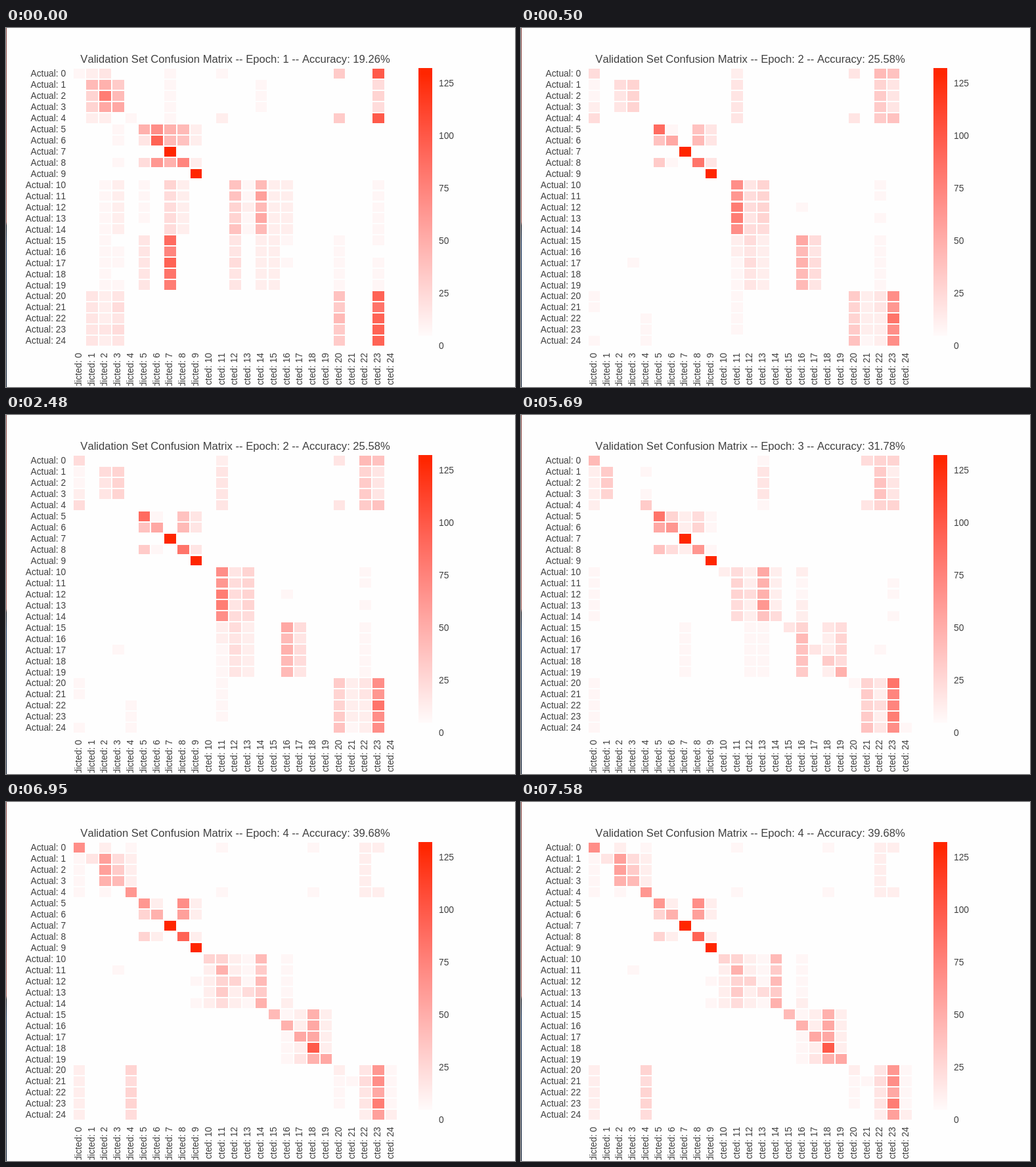
Recreate the animation shown at these times as an HTML page. Size 775 by 547 pixels, loop 8000 ms.

```html
<!DOCTYPE html>
<html lang="en">
<head>
<meta charset="utf-8">
<title>Validation Set Confusion Matrix</title>
<style>
  html, body { margin: 0; width: 100%; height: 100%; overflow: hidden; background: #fefefe; }
  svg { display: block; width: 775px; height: 547px; }
  text { font: 13.8px "Liberation Sans", Arial, sans-serif; font-kerning: none; fill: #404040; }
  .title { font-size: 16.6px; text-anchor: middle; }
  .end { text-anchor: end; }
  rect { shape-rendering: crispEdges; }
</style>
</head>
<body>
<svg id="stage" viewBox="0 0 775 547">
  <defs>
    <linearGradient id="edge" x1="0" y1="0" x2="0" y2="1">
      <stop offset="0" stop-color="#8c4a46"/>
      <stop offset=".54" stop-color="#a8605a"/>
      <stop offset=".55" stop-color="#10141c"/>
      <stop offset=".6" stop-color="#12305a"/>
      <stop offset="1" stop-color="#0c1a30"/>
    </linearGradient>
    <clipPath id="crop"><rect width="775" height="545"/></clipPath>
  </defs>
  <rect width="775" height="547" fill="#fefefe"/>
  <rect width="1" height="547" fill="url(#edge)"/>
</svg>
<script>
const svg = document.getElementById('stage');
const SIZE = 25, TOP_LEVEL = 25, LOOP = 8000;
const X0 = 101.4, Y0 = 61, W = 19.8, H = 16.95, GAP = 1.1;
const BAR = { x: 628, top: 61, bottom: 469, width: 21, zero: 484.6, unit: 3.205 };

// Classes that are mistaken for the same others.
const outer = [0, 4], inner = [1, 2, 3], trio = [5, 6, 8], clear = [7, 9];
const five = first => Array.from({ length: 5 }, (_, i) => first + i);
const tens = five(10), teens = five(15), last = five(20);

const epochs = [];

function epoch(start, accuracy) {
  epochs.push({ start, accuracy, levels: Array(SIZE * SIZE).fill(0) });
  mix(clear, TOP_LEVEL, {});
}

function random(seed) {
  const s = Math.sin(seed * 12.9898 + 4.1) * 43758.5453;
  return s - Math.floor(s);
}

// Rows of a group share their mean level per column, plus a peak on the diagonal.
function mix(group, peak, columns) {
  const { levels } = epochs[epochs.length - 1];
  for (const r of group) {
    for (let c = 0; c < SIZE; c++) {
      const i = r * SIZE + c;
      const jitter = 0.8 + 0.4 * random(epochs.length * 1000 + i);
      const level = (columns[c] || 0) * jitter + (r === c ? peak : 0);
      levels[i] = Math.min(TOP_LEVEL, Math.round(level));
    }
  }
}

epoch(0, 19.26);
mix(outer, 1, { 1: 2, 2: 3, 7: 1, 11: 1.5, 20: 5.5, 23: 16 });
mix(inner, 4, { 1: 4, 2: 9, 3: 7, 7: 1, 14: 1, 23: 4 });
mix(trio, 6, { 3: 1, 5: 3, 6: 11, 7: 8, 8: 7, 9: 2 });
mix(tens, 0, { 2: 1, 3: 2, 5: 0.5, 7: 4.4, 8: 2, 12: 5.5, 13: 1.5, 14: 9, 15: 2, 16: 2, 23: 1 });
mix(teens, 0, { 2: 0.5, 3: 0.5, 5: 3, 7: 16, 12: 3, 14: 2, 15: 2, 16: 0.5, 20: 1, 23: 0.5 });
mix(last, 0, { 1: 3, 2: 2.5, 3: 3, 20: 7, 23: 17 });

epoch(500, 25.58);
mix(outer, 0, { 0: 4, 11: 2.5, 20: 3, 22: 7, 23: 7.5 });
mix(inner, 0, { 0: 1.5, 2: 3.5, 3: 5, 11: 3, 22: 6, 23: 3 });
mix(trio, 9, { 5: 7, 6: 1, 8: 7, 9: 3 });
mix(tens, 0, { 0: 0.5, 11: 14, 12: 3.2, 13: 4.6, 16: 0.5, 22: 0.5 });
mix(teens, 0, { 3: 0.5, 11: 1.5, 12: 3.5, 13: 2, 16: 9, 17: 4, 22: 1 });
mix(last, 0, { 0: 0.5, 4: 0.5, 11: 0.5, 20: 6, 21: 1.6, 22: 2.5, 23: 14 });

epoch(3800, 31.78);
mix(outer, 6, { 0: 2, 13: 1, 21: 3.5, 22: 4, 23: 4.5 });
mix(inner, 0, { 0: 2, 1: 5.5, 4: 0.5, 13: 3, 22: 7, 23: 2.5 });
mix(trio, 7, { 5: 9, 6: 5, 7: 2, 8: 4, 9: 1 });
mix(tens, 2, { 0: 1, 11: 4, 12: 1.8, 13: 9, 14: 2.6, 16: 1.6, 23: 0.5 });
mix(teens, 3, { 7: 1, 12: 1, 13: 1, 16: 6, 18: 2.5, 19: 4.8, 22: 0.5 });
mix(last, 1, { 0: 1, 21: 6, 22: 2.5, 23: 14 });

epoch(6950, 39.68);
mix(outer, 11, { 0: 1.5, 2: 1.5, 4: 1, 11: 1, 18: 1, 22: 2, 23: 2 });
mix(inner, 3, { 0: 0.5, 2: 10, 3: 5, 4: 2, 22: 2 });
mix(trio, 7, { 5: 5, 6: 2, 8: 11, 9: 2 });
mix(tens, 3, { 3: 0.5, 9: 0.5, 10: 2, 11: 5, 12: 2, 13: 1, 14: 7, 16: 1.6 });
mix(teens, 8, { 16: 1, 17: 2.5, 18: 9, 19: 2 });
mix(last, 1, { 0: 2, 4: 4.4, 20: 0.5, 22: 3, 23: 12, 24: 1 });

function add(tag, attrs, content, parent = svg) {
  const el = document.createElementNS('http://www.w3.org/2000/svg', tag);
  for (const k in attrs) el.setAttribute(k, attrs[k]);
  if (content !== undefined) el.textContent = content;
  return parent.appendChild(el);
}

function shade(level) {
  if (!level) return '#fefefe';
  const t = Math.min(1, level / TOP_LEVEL);
  const g = Math.round(255 - 217 * t);
  const b = Math.round(255 - 225 * t - 30 * t ** 4);
  return `rgb(255,${g},${b})`;
}

const title = add('text', { x: 349, y: 53, class: 'title' });
const cells = Array.from({ length: SIZE * SIZE }, (_, i) => add('rect', {
  x: X0 + (i % SIZE) * W + GAP, y: Y0 + Math.floor(i / SIZE) * H + GAP,
  width: W - 2 * GAP, height: H - 2 * GAP
}));

const footer = add('g', { 'clip-path': 'url(#crop)' });
for (let i = 0; i < SIZE; i++) {
  const x = X0 + (i + 0.5) * W + 3.5;
  add('text', { x: 91.2, y: Y0 + (i + 0.5) * H + 5, class: 'end' }, 'Actual: ' + i);
  add('text', { transform: `translate(${x} 495) rotate(-90)`, class: 'end' }, 'Predicted: ' + i, footer);
}

const step = (BAR.zero - BAR.top) / (TOP_LEVEL + 1);
for (let y = BAR.top; y < BAR.bottom; y++) {
  const fill = shade((BAR.zero - y) / step - 0.5);
  add('rect', { x: BAR.x, y, width: BAR.width, height: 1, fill });
}
for (let v = 0; v <= 125; v += 25)
  add('text', { x: 659, y: BAR.zero - v * BAR.unit + 4.8 }, v);

let shown = -1;
function draw(time) {
  const t = time % LOOP;
  const n = epochs.filter(e => e.start <= t).length - 1;
  if (n === shown) return;
  shown = n;
  const { accuracy, levels } = epochs[n];
  title.textContent = `Validation Set Confusion Matrix -- Epoch: ${n + 1} -- Accuracy: ${accuracy}%`;
  cells.forEach((cell, i) => cell.setAttribute('fill', shade(levels[i])));
}

function tick() {
  draw(performance.now());
  requestAnimationFrame(tick);
}
tick();
</script>
</body>
</html>
```
